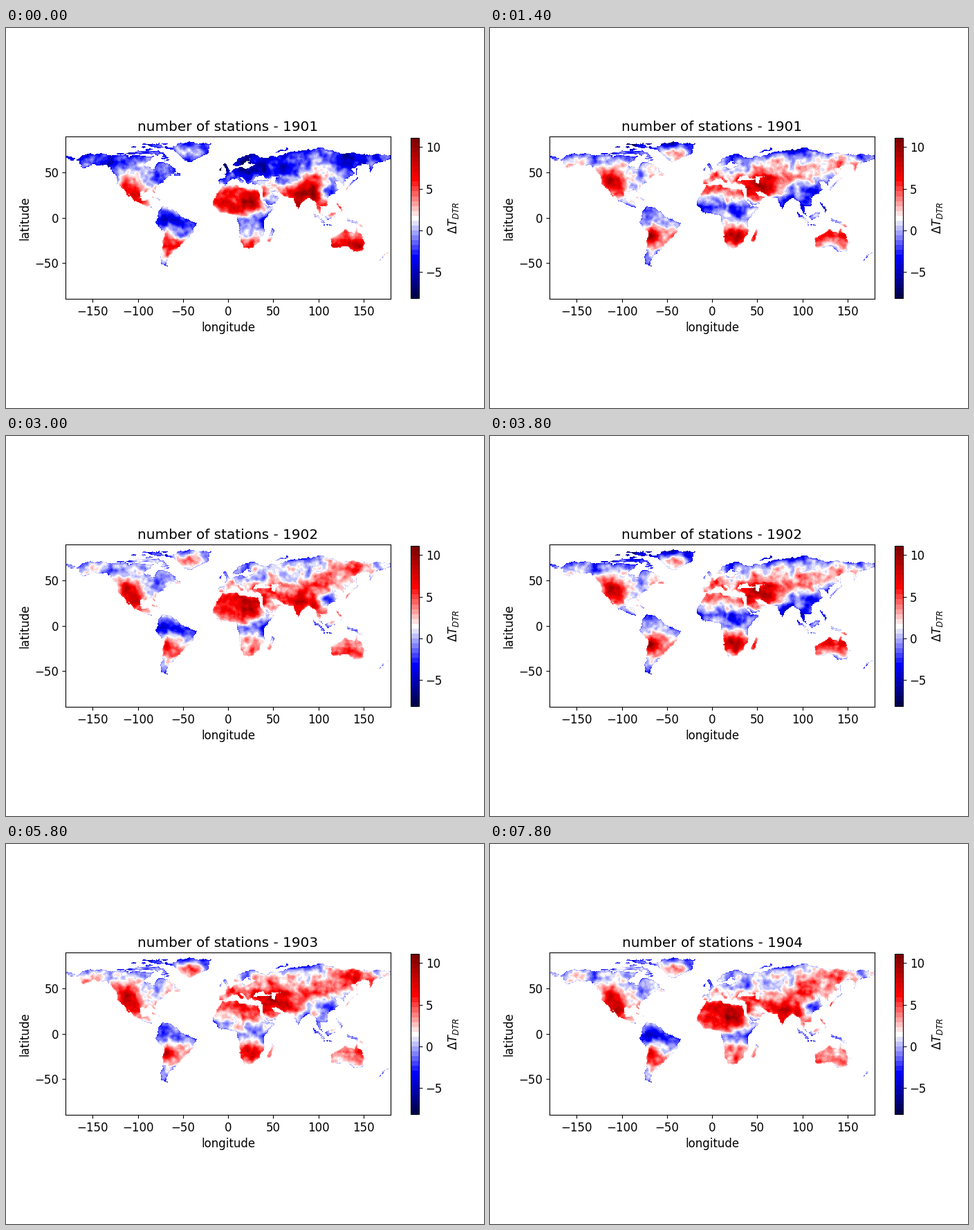
Write a matplotlib script that moves like this. It is 691 px wide and 550 px high and loops after 8 s.

```python
import numpy as np
import matplotlib.pyplot as plt
from matplotlib.animation import FuncAnimation
from matplotlib.path import Path

plt.rcParams.update({"font.size": 12, "font.family": "DejaVu Sans"})

W, H, DPI = 691, 550, 100
NLON, NLAT = 720, 360
MONTHS = 40
VMIN, VMAX = -8.17, 11.12
MID = (VMIN + VMAX) / 2

lon, lat = np.meshgrid(-179.75 + 0.5 * np.arange(NLON), 89.75 - 0.5 * np.arange(NLAT))
fy, fx = np.meshgrid(np.fft.fftfreq(NLAT), np.fft.fftfreq(NLON), indexing="ij")


def blur(a, sx, sy):
    kernel = np.exp(-2 * np.pi**2 * ((sx * fx) ** 2 + (sy * fy) ** 2))
    return np.fft.ifft2(np.fft.fft2(a) * kernel).real


def noise(seed, sx, sy=None):
    a = blur(np.random.default_rng(seed).normal(size=(NLAT, NLON)), sx, sy or sx)
    return a / a.std()


# --- land mask: a few corner points per coast, roughened by noise ---
rx = lon + 0.35 * noise(1, 1.3) + 0.5 * noise(2, 4)
ry = lat + 0.35 * noise(3, 1.3) + 0.5 * noise(4, 4)
rough = np.column_stack([rx.ravel(), ry.ravel()])
mask = np.zeros((NLAT, NLON), bool)


def land(*pts):
    mask[Path(np.reshape(pts, (-1, 2))).contains_points(rough).reshape(mask.shape)] = True


def isle(x0, y0, x1, y1, width):
    """Strip of land along the line between two points."""
    dx, dy = x1 - x0, y1 - y0
    t = np.clip(((rx - x0) * dx + (ry - y0) * dy) / (dx * dx + dy * dy), 0, 1)
    mask[np.hypot(rx - x0 - t * dx, ry - y0 - t * dy) < width / 2] = True


# Arctic archipelago, broken into strips
land(-124, 70, -118, 77, -90, 82, -64, 83, -78, 74, -62, 66, -70, 63, -82, 70)
mask &= noise(5, 5, 1.3) > np.where(lat > 74, 0.1, -0.3)

# Americas and Greenland
land(-168, 65, -157, 71, -128, 70, -95, 68, -82, 68, -94, 59, -82, 53, -77, 62, -65, 60,
     -56, 52, -65, 46, -75, 38, -81, 31, -81, 26, -84, 30, -97, 28, -96, 19, -88, 21,
     -84, 11, -78, 8, -92, 14, -105, 20, -114, 31, -123, 38, -124, 47, -134, 58,
     -150, 60, -162, 55, -165, 62)
land(-72, 78, -45, 83.5, -19, 82, -22, 71, -43, 62, -54, 68, -60, 76)
land(-77, 8, -72, 12, -62, 10.5, -50, 0, -35, -6, -39, -18, -48, -26, -58, -36, -65, -42,
     -69, -52, -66, -55, -75, -50, -73, -38, -70, -18, -81, -5, -77, 4)
isle(-113, 29, -110, 23.5, 1.5)
isle(-84, 22, -76, 20.5, 1.2)
isle(-58, 48, -54, 48, 3)

# Africa and Europe
land(-6, 36, 10, 37, 11, 33, 33, 31, 37, 21, 43, 11.5, 51, 12, 40, -3, 40, -15, 33, -27,
     26, -34, 18, -34, 12, -17, 13, -9, 9, 4, -8, 4.5, -17, 14, -14, 26)
land(-9, 37, -9, 43, -1, 44, -4, 48, 8, 54, 21, 55, 30, 60, 60, 60, 60, 46, 48, 46, 48, 42,
     40, 44, 39, 47, 31, 46, 28, 41, 23, 37, 14, 45.5, 12, 45, 18, 40, 16, 38, 9, 44,
     3, 43, -2, 37)
land(5, 59, 12, 65, 25, 71, 41, 67, 60, 69, 60, 58, 30, 59.5, 22, 61, 25, 65.5, 18, 61, 13, 56)
isle(-1, 52, -4, 58, 3.5)
isle(-8, 53, -7, 54.5, 2)
isle(45.5, -24, 49, -14, 4)

# Asia
land(27, 37, 36, 36, 39, 21, 45, 13, 59, 22, 51, 24.5, 48, 30, 57, 27, 60, 25, 60, 46,
     53, 45, 53, 37, 49, 38, 47, 42, 27, 41)
land(60, 69, 70, 73, 104, 77.5, 130, 71, 160, 70, 181, 69, 181, 65, 163, 60, 157, 51,
     156, 61, 136, 54, 140, 49, 130, 42, 60, 42)
land(60, 43, 130, 43, 128, 35, 124, 40, 118, 39, 122, 30, 109, 21, 109, 12, 101, 13,
     104, 1.5, 98, 9, 97, 17, 90, 22, 80, 15, 77, 8, 72, 21, 60, 25)
isle(-180, 67, -171, 66, 2.5)
isle(131, 33, 143, 43, 2)
isle(143, 47, 143, 54, 1.2)
isle(54, 72, 66, 76.5, 1.5)
isle(96, 4.5, 105, -5, 2.5)
isle(106, -7, 115, -8, 1)
isle(111, 0, 116, 3, 6)
isle(121, 17, 125, 7, 1.5)

# Oceania
land(114, -22, 116, -34, 131, -31.5, 140, -38, 148, -38, 153, -28, 142, -11, 140, -17,
     131, -12, 122, -18)
isle(133, -2, 148, -9, 2.5)
isle(168, -45.5, 177, -38.5, 1)

# --- climate: levels by latitude for winter, April and August ---
bands = -55, -32, -20, -3, 12, 27, 42, 55, 68, 82
zonal = np.array([
    np.interp(lat, bands, (-4, 4.5, 0, -2.5, 4, 4, -2, -4.5, -4.5, -4.5)),
    np.interp(lat, bands, (-4, 2.5, 1, -3, 3.5, 5, 1, -1.5, -1, -3)),
    np.interp(lat, bands, (-5, 1, 4.5, -1, -4, 2.5, 3, 0.5, -2.5, -6)),
])

# regional departures: lon, lat, radius, then winter, April, August
regions = [
    (-112, 37, 11, 4, 4.5, 4),         # dry west of North America
    (-86, 40, 13, -2, -2.5, -3),       # humid east
    (-88, 54, 11, 4.5, 1, 0),          # central Canada
    (-82, 14, 8, -4, -3, 2),           # Central America
    (-42, 73, 6, 2, 3.5, 4.5),         # inner Greenland
    (-63, 6, 9, -4, -4, 0),            # northern Amazon basin
    (-69, -23, 5, 1.5, 3, 3),          # Andes
    (-42, -17, 9, -2, -1.5, -2),       # eastern Brazil
    (22, 53, 18, -2.5, 0, -0.5),       # Europe
    (18, 14, 15, 2.5, 2.5, 0),         # Sahel
    (45, 7, 8, -4, -3, 1),             # Horn of Africa
    (23, -22, 8, 0, 1, 3.5),           # southern Africa
    (58, 34, 12, 0, 0.5, 5),           # Iran
    (47, 20, 7, -3.5, -3, 1),          # Arabia
    (82, 21, 10, 0, 0, -5),            # India
    (92, 32, 9, 5, 1, -2),             # Tibet
    (111, 28, 8, -10, -9.5, -6.5),     # southern China
    (105, 47, 12, 5, 4, 0),            # Mongolia
    (129, 38, 8, -1, -1.5, -5),        # Korea and Japan
    (135, 65, 9, -2, 5, 3),            # Yakutia
    (133, -22, 16, 3.5, 1.5, 0.5),     # Australia
]
levels = zonal[:, mask]
x, y = lon[mask], lat[mask]
for cx, cy, radius, *change in regions:
    squeeze = np.cos(np.radians(cy)) ** 0.5
    d2 = (squeeze * (x - cx)) ** 2 + (y - cy) ** 2
    levels = levels + np.outer(change, np.exp(-d2 / (2 * radius**2)))

coast = 1 - blur(mask.astype(float), 1.4, 1.4)[mask]
texture = 0.8 * noise(6, 6)[mask] + 0.5 * noise(7, 2.8)[mask] - 3 * coast


def harmonics(month):
    phase = 2 * np.pi * (month + 0.5) / 12
    return np.array([1, np.cos(phase), np.sin(phase)])


# yearly cycle passing through the three seasonal levels
to_season = np.linalg.inv([harmonics(m) for m in (-0.5, 3, 7)])


def field(i):
    out = np.full(mask.shape, np.nan)
    out[mask] = (MID + harmonics(i) @ to_season @ levels + texture
                 + 0.5 * noise(100 + i, 8)[mask])
    return np.ma.masked_invalid(out)


def box(x, y, w, h):
    return [x / W, 1 - (y + h) / H, w / W, h / H]


fig = plt.figure(figsize=(W / DPI, H / DPI), dpi=DPI)
ax = fig.add_axes(box(86.1, 157.2, 469.9, 235))
im = ax.imshow(field(0), extent=(-180, 180, -90, 90), cmap=plt.get_cmap("seismic", 33),
               vmin=VMIN, vmax=VMAX, interpolation="nearest")
ax.set_xlabel("longitude")
ax.set_ylabel("latitude")
title = ax.set_title("number of stations - 1901")
bar = fig.colorbar(im, cax=fig.add_axes(box(585, 159, 12, 232.4)), ticks=[-5, 0, 5, 10])
bar.set_label(r"$\Delta T_{DTR}$")


def update(i):
    im.set_data(field(i))
    title.set_text(f"number of stations - {1901 + i // 12}")
    return im, title


anim = FuncAnimation(fig, update, frames=MONTHS, interval=200, repeat=True, blit=False)
plt.show()
```
